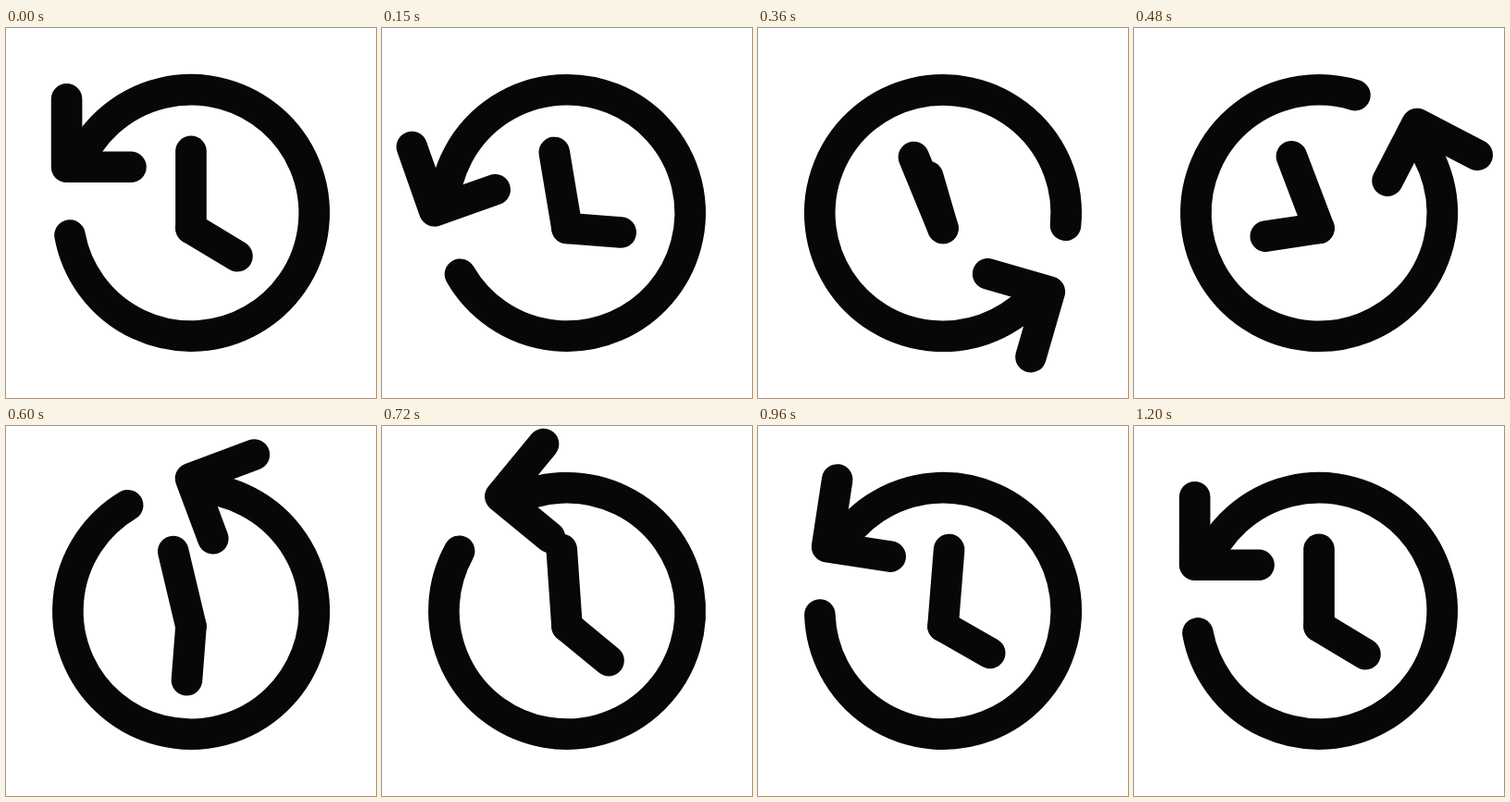
An HTML page that plays this animation: 400x400 px, repeating every 3230 ms.

```html
<!DOCTYPE html>
<html lang="en">
<head>
<meta charset="utf-8">
<title>History icon</title>
<style>
  html, body { margin: 0; height: 100%; overflow: hidden; background: #fff; }
  svg { display: block; width: 100%; height: 100%; }
  path { fill: none; stroke: #070707; stroke-width: 33.6; stroke-linecap: round; stroke-linejoin: round; }
</style>
</head>
<body>
<svg viewBox="0 0 400 400">
  <g id="ring">
    <path d="M76.5 150A133.2 133.2 0 1 1 69 224"/>
    <path d="M65.6 76.8V150.3H135"/>
  </g>
  <path id="long" d="M200 216.5V133.3"/>
  <path id="short" d="M200 216.5L250 246.7"/>
</svg>
<script>
const LOOP = 3230, STEP = 30;

// Cubic easing from (0,0) to (1,1) with flat ends and handles at x1 and x2.
function ease(x, x1, x2) {
  let lo = 0, hi = 1;
  for (let i = 0; i < 24; i++) {
    const s = (lo + hi) / 2, r = 1 - s;
    if (3 * s * r * r * x1 + 3 * s * s * r * x2 + s ** 3 < x) lo = s;
    else hi = s;
  }
  return lo * lo * (3 - 2 * lo);
}

// Each part: pivot y, then segments of [end time, end angle, x1, x2].
const parts = [
  { id: "ring", y: 200, keys: [[1220, -360, .363, .135]] },
  { id: "long", y: 216.5, keys: [[400, -22.6, .333, .45], [930, 4.7, .333, .62], [1200, 0, .333, .667]] },
  { id: "short", y: 216.5, keys: [[830, -370, .381, .667], [1000, -360, .333, .667]] }
];

function angleAt(keys, t) {
  let start = 0, from = 0;
  for (const [end, to, x1, x2] of keys) {
    if (t < end) return from + (to - from) * ease((t - start) / (end - start), x1, x2);
    start = end;
    from = to;
  }
  return from;
}

function draw(now) {
  const t = Math.floor(now % LOOP / STEP) * STEP;
  for (const { id, y, keys } of parts) {
    document.getElementById(id).setAttribute("transform", `rotate(${angleAt(keys, t)} 200 ${y})`);
  }
}

let begin;
function tick(now) {
  begin ??= now;
  draw(now - begin);
  requestAnimationFrame(tick);
}
draw(0);
requestAnimationFrame(tick);
</script>
</body>
</html>
```
